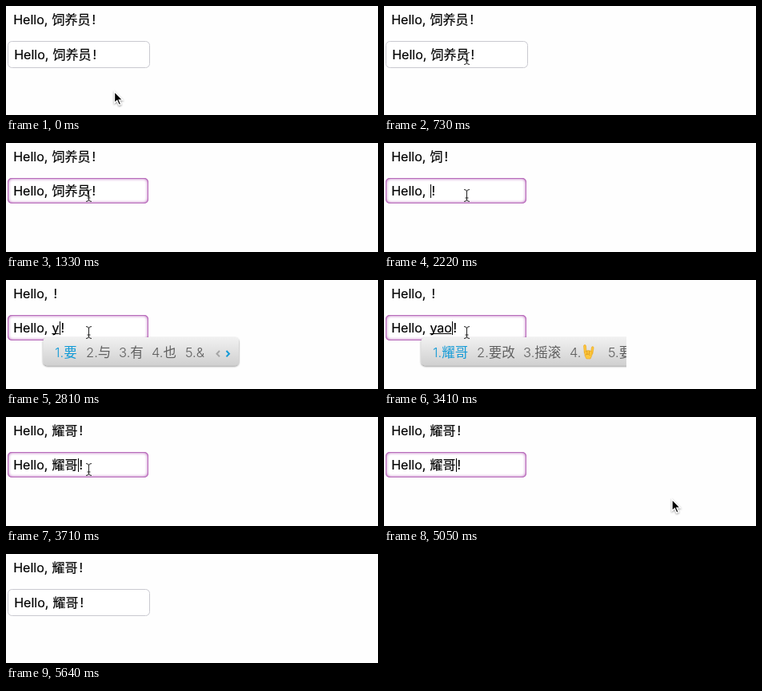
Recreate the animation shown at these times as an HTML page. Size 465x137 px, loop 6190 ms.

```html
<!DOCTYPE html>
<html lang="zh">
<head>
<meta charset="utf-8">
<title>Input binding</title>
<style>
html, body { margin: 0; width: 100%; height: 100%; overflow: hidden; background: #fefefe; }
svg { display: block; width: 100vw; height: 100vh; }
text { font: 16px Inter, "Noto Sans CJK SC", sans-serif; white-space: pre; }
#label text, #field text { stroke: #000; stroke-width: .2px; }
#menu text { font-size: 16.5px; font-weight: 300; fill: #606060; }
#menu text.on { fill: #149bd7; }
</style>
</head>
<body>
<svg id="stage" viewBox="0 0 465 137">
  <defs>
    <linearGradient id="metal" x2="0" y2="1">
      <stop stop-color="#f1f1f1"/><stop offset="1" stop-color="#d0d0d0"/>
    </linearGradient>
    <filter id="soft" x="-10%" y="-40%" width="120%" height="180%"><feGaussianBlur stdDeviation="2"/></filter>
    <filter id="drop" x="-5%" y="-20%" width="110%" height="150%">
      <feDropShadow dx="0" dy="1" stdDeviation="1" flood-opacity=".5"/>
    </filter>
    <clipPath id="inside"><rect x="2" y="44" width="176" height="32" rx="5"/></clipPath>
    <clipPath id="window"><rect id="pane" x="40" y="66" height="50"/></clipPath>
  </defs>
  <g id="label"></g>
  <rect id="plain" x="2.5" y="44.5" width="177" height="33" rx="5" fill="#fff" stroke="#c9c9d0"/>
  <g id="glow" fill="none">
    <g clip-path="url(#inside)">
      <rect x="2" y="44" width="176" height="32" fill="#fff"/>
      <rect x="-3" y="39" width="186" height="42" rx="10" stroke="#8c0f90" stroke-width="10" filter="url(#soft)"/>
    </g>
    <rect x="2.5" y="44.5" width="175" height="31" rx="4.5" stroke="#a44ca8" stroke-opacity=".55"/>
  </g>
  <g id="field"></g>
  <path id="caret" stroke="#000" d="M0 52V69"/>
  <g id="menu" clip-path="url(#window)"></g>
  <path id="arrow" d="M0 0V14.5L3.3 11.5L5.8 17L8.3 15.9L5.9 10.6H10.3Z" stroke="#fff" stroke-width="1.4" style="filter:drop-shadow(0 1px 1px #0006)"/>
  <path id="beam" fill="none" stroke="#222" d="M-3.5 -7.5Q0 -7.5 0 -5Q0 -7.5 3.5 -7.5M0 -5.5V5.5M-3.5 7.5Q0 7.5 0 5Q0 7.5 3.5 7.5M-2 3H2"/>
</svg>
<script>
const LOOP = 6190;
const $ = id => document.getElementById(id);
const show = (id, on) => $(id).setAttribute('display', on ? 'inline' : 'none');
const put = (id, x, y) => $(id).setAttribute('transform', `translate(${x} ${y})`);
const at = (keys, t) => keys.filter(k => k[0] <= t).pop();
const text = (x, y, s, cls = '') => `<text x="${x}" y="${y}" class="${cls}">${s}</text>`;

// [time, x, y, shape]
const pointer = [
  [0, 135.5, 107.5, 'arrow'], [150, 133, 104, 'arrow'], [300, 124, 91, 'arrow'],
  [450, 112, 76, 'beam'], [600, 105, 68, 'beam'], [730, 103.5, 66, 'beam'],
  [4310, 122, 68, 'beam'], [4460, 190, 84, 'arrow'], [4600, 282, 106, 'arrow'],
  [4750, 348, 117, 'arrow'], [4900, 374, 119, 'arrow'], [5050, 360, 103.5, 'arrow'],
  [5640, 0, 0, '']
];
const typed = [
  [0, '饲养员'], [1630, '饲养'], [1930, '饲'], [2220, ''], [2810, 'y'],
  [2960, 'ya'], [3260, 'yao'], [3560, 'yao g'], [3710, '耀哥']
];
const bound = [[0, '饲养员'], [1630, '饲养'], [1930, '饲'], [2370, ''], [3710, '耀哥']];
const caretOn = [[0, 0], [880, 1], [1330, 0], [1630, 1], [4310, 0], [4750, 1], [5200, 0]];

// [time, candidates, right edge, visible right edge]
const long = '耀哥 要改 摇滚 🤘 要给';
const menus = [
  [0, ''], [2810, '要 与 有 也 &amp;', 291, 320], [2960, '呀 亚 压 牙 鸭', 299, 320],
  [3260, '要 药 摇 腰 咬', 299, 320], [3410, long, 378, 303], [3560, long, 378, 400], [3710, '']
];
const narrow = [61, 100, 141, 182, 224], wide = [61, 116, 174, 232, 280];

function horns(x, y) {
  return `<g transform="translate(${x} ${y})" stroke="#e9a21c" stroke-width=".6" fill="#fdc83c">
    <rect x="2.4" y="-14.5" width="2.8" height="11" rx="1.4" transform="rotate(-5 4 -4)"/>
    <rect x="10.2" y="-12.5" width="2.6" height="10" rx="1.3" transform="rotate(9 11 -3)"/>
    <path d="M2.8 -6Q7.5 -9 12 -6L11.8 -1L10 3H5L3 -1Z"/>
    <path d="M5.8 -7.3V-3M8.7 -7.3V-3M4 -2Q8 -4 9.6 -1" fill="none" stroke="#c98214"/></g>`;
}

function menuMarkup(words, right) {
  const xs = words === long ? wide : narrow;
  const items = words.split(' ').map((w, i) => {
    const hand = w === '🤘';
    return text(xs[i], 96.5, `${i + 1}.${hand ? '' : w}`, i ? '' : 'on') + (hand ? horns(xs[i] + 16, 96) : '');
  });
  const chevron = (x, turn, color) =>
    `<path d="M${x} 89l${3.5 * turn} 3.7l${-3.5 * turn} 3.7" fill="none" stroke="${color}" stroke-width="2"/>`;
  return `<rect x="46.5" y="72" width="${right - 46.5}" height="35.5" rx="5" fill="url(#metal)" filter="url(#drop)"/>`
    + items.join('') + chevron(right - 24, -1, '#a5a5a5') + chevron(right - 15.5, 1, '#149bd7');
}

// Returns the line and the x where the typed part ends.
function line(x, y, word) {
  const latin = /^[a-z]/.test(word);
  const start = x + 48.2;
  const end = start + (latin ? [0, 9, 18, 27, 0, 41][word.length] : word.length * 16);
  const rule = latin ? `<path d="M${start} ${y + 1.5}H${end}" stroke="#000"/>` : '';
  return [text(x, y, 'Hello,') + text(start, y, word) + rule + text(end + 2, y, '!'), end];
}

function render(t) {
  const focus = t >= 880 && t < 5200;
  $('label').innerHTML = line(9.2, 23, at(bound, t)[1])[0];
  const [markup, end] = line(focus ? 9.2 : 10.2, focus ? 66 : 67, at(typed, t)[1]);
  $('field').innerHTML = markup;
  show('plain', !focus);
  show('glow', focus);
  show('caret', at(caretOn, t)[1]);
  put('caret', Math.floor(end) + 1.5, 0);

  const [, words, right, edge] = at(menus, t);
  $('menu').innerHTML = words ? menuMarkup(words, right) : '';
  if (words) $('pane').setAttribute('width', edge - 40);

  const [, x, y, shape] = at(pointer, t);
  for (const id of ['arrow', 'beam']) {
    show(id, id === shape);
    put(id, x, y);
  }
}

const begin = performance.now();
function tick() {
  render((performance.now() - begin) % LOOP);
  requestAnimationFrame(tick);
}
render(0);
requestAnimationFrame(tick);
</script>
</body>
</html>
```
